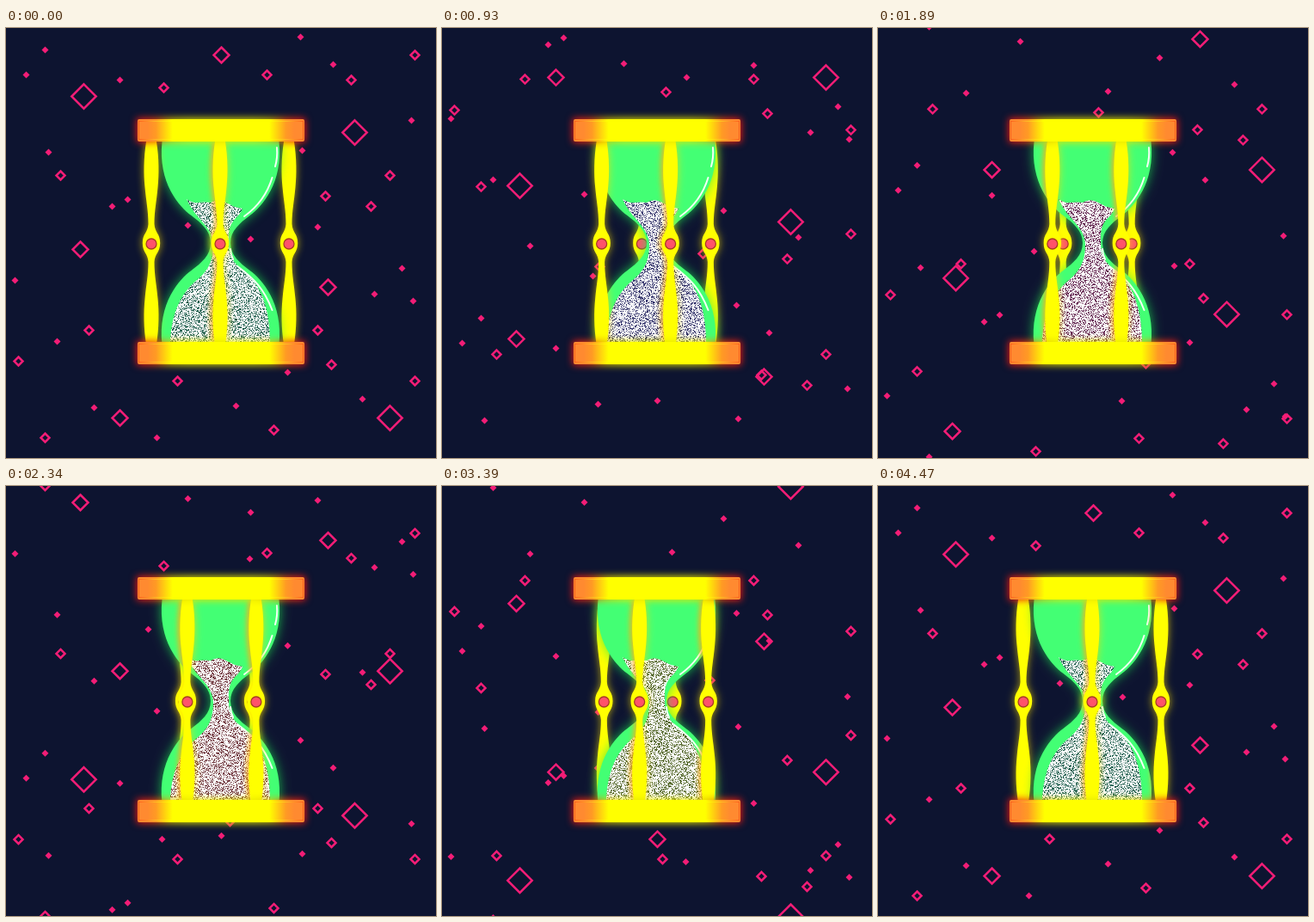
Write an HTML page with a canvas that moves like this. It is 500 px wide and 500 px high and loops after 4500 ms.

```html
<!DOCTYPE html>
<html lang="en">
<head>
<meta charset="utf-8">
<title>Hourglass</title>
<style>
  html, body { margin: 0; width: 100%; height: 100%; overflow: hidden; background: #0d1430; }
  canvas { display: block; width: 500px; height: 500px; }
</style>
</head>
<body>
<canvas id="stage" width="500" height="500"></canvas>
<script>
const ctx = document.getElementById('stage').getContext('2d');
const STEP = 30, STEPS = 150, SIZE = 500;
const YELLOW = '#ffff00', GREEN = '#43ff74', PINK = '#f21d76';

// Each layer falls a whole number of stage heights per loop.
const layers = [
  { speed: 1, half: 14.2, spots: [[90, 79], [405, 121], [446, 453]] },
  { speed: 1, half: 9, spots: [[250, 31], [86, 257], [374, 301], [132, 453]] },
  { speed: 2, half: 5, spots: [
    [183, 69], [303, 54], [401, 60], [475, 31], [63, 171], [446, 171], [371, 195], [424, 207],
    [96, 351], [362, 351], [14, 387], [378, 391], [199, 410], [475, 410], [45, 476], [311, 467],
    [260, 366], [256, 175]] },
  { speed: 3, half: 4, solid: true, spots: [
    [45, 25], [23, 54], [132, 60], [342, 10], [380, 42], [471, 107], [49, 144], [123, 207],
    [141, 199], [344, 142], [211, 229], [284, 245], [362, 231], [10, 293], [460, 279], [428, 309],
    [473, 317], [59, 364], [102, 441], [267, 439], [327, 400], [175, 476], [414, 431],
    [165, 381], [283, 299], [181, 125], [250, 121]] }
];

function diamond(x, y, half, solid) {
  ctx.beginPath();
  ctx.moveTo(x, y - half);
  ctx.lineTo(x + half, y);
  ctx.lineTo(x, y + half);
  ctx.lineTo(x - half, y);
  ctx.closePath();
  if (solid) ctx.fill(); else ctx.stroke();
}

function drawSky(p) {
  ctx.fillStyle = '#0d1430';
  ctx.fillRect(0, 0, SIZE, SIZE);
  ctx.fillStyle = ctx.strokeStyle = PINK;
  ctx.lineWidth = 2.5;
  for (const { speed, half, solid, spots } of layers) {
    for (const [x, y0] of spots) {
      const y = (y0 + p * speed * SIZE) % SIZE;
      for (const wrap of [-SIZE, 0, SIZE]) diamond(x + 0.5, y + wrap + 0.5, half, solid);
    }
  }
}

// Builds a shape from its right side; the left side is the same turned by 180 degrees.
function turned(cx, cy, trace) {
  const path = new Path2D();
  for (const s of [1, -1]) {
    const at = (...v) => v.map((n, i) => (i % 2 ? cy : cx) + s * n);
    trace(
      (...v) => path.lineTo(...at(...v)),
      (...v) => path.bezierCurveTo(...at(...v)));
  }
  path.closePath();
  return path;
}

const glass = turned(249.5, 250, (line, curve) => {
  line(68, -118);
  curve(73, -70, 48, -42, 34, -32);
  curve(22, -23, 11.5, -14, 11.5, 0);
  curve(11.5, 14, 22, 23, 34, 32);
  curve(48, 42, 73, 70, 68, 118);
});

const pillar = turned(0, 250, (line, curve) => {
  line(6, -118);
  curve(9, -98, 9, -80, 7.5, -65);
  curve(6, -48, 3.5, -38, 3.5, -22);
  curve(4, -12, 10.2, -11, 10.2, 0);
  curve(10.2, 11, 4, 12, 3.5, 22);
  curve(3.5, 38, 6, 48, 7.5, 65);
  curve(9, 80, 9, 98, 6, 118);
});

const sand = new Path2D(
  'M210 199 Q217 204 224 203 T238 203 Q246 198 254 202 T266 208 L275 210 ' +
  'Q272 217 266 222 C258 231 259 240 259 250 C259 263 263 273 275 281 ' +
  'C296 297 307 326 307 366 L191 366 C192 333 203 309 221 294 ' +
  'C236 282 241 270 241 252 C241 236 228 226 219 214 Q214 208 210 199Z');

const shine = new Path2D(
  'M315 139 Q316 151 313 161 M309.5 174 Q301 202 277 219 ' +
  'M261 257 Q261 263 264 269 M269 277 C288 291 300 303 309.5 328');

// Sand grains: each one has its own phase in a loop-long shimmer.
const grainBox = { x: 188, y: 196, w: 122, h: 172 };
const grainCanvas = document.createElement('canvas');
grainCanvas.width = grainBox.w;
grainCanvas.height = grainBox.h;
const grainCtx = grainCanvas.getContext('2d');
const grains = grainCtx.createImageData(grainBox.w, grainBox.h);
let seed = 7;
const phases = Array.from({ length: grainBox.w * grainBox.h }, () => {
  seed = (Math.imul(seed, 1664525) + 1013904223) >>> 0;
  return seed / 4294967296;
});

function drawSand(p) {
  const hue = 165 + 360 * p;
  const depth = [0, 120, 240].map(c => 200 * (1 - 0.2 * Math.cos((hue - c) * Math.PI / 180)));
  phases.forEach((phase, i) => {
    const dark = Math.max(0, Math.sin((phase + p) * Math.PI * 2));
    for (let c = 0; c < 3; c++) grains.data[i * 4 + c] = 255 - dark * depth[c];
    grains.data[i * 4 + 3] = 255;
  });
  grainCtx.putImageData(grains, 0, 0);
  ctx.save();
  ctx.clip(sand);
  ctx.drawImage(grainCanvas, grainBox.x, grainBox.y);
  ctx.restore();
}

function drawGlass(p) {
  ctx.save();
  ctx.shadowColor = 'rgba(30,235,80,.75)';
  ctx.shadowBlur = 13;
  ctx.fillStyle = GREEN;
  ctx.fill(glass);
  ctx.restore();
  drawSand(p);
  ctx.strokeStyle = '#f4fff6';
  ctx.lineWidth = 2;
  ctx.lineCap = 'round';
  ctx.stroke(shine);
}

function drawPillar(x, front) {
  if (front) {
    ctx.save();
    ctx.clip(glass);
    ctx.translate(x - 3, 0);
    ctx.filter = 'blur(2.5px)';
    ctx.fillStyle = 'rgba(255,140,40,.6)';
    ctx.fill(pillar);
    ctx.restore();
  }
  ctx.save();
  ctx.translate(x, 0);
  ctx.shadowColor = 'rgba(255,225,0,.7)';
  ctx.shadowBlur = 10;
  ctx.fillStyle = YELLOW;
  ctx.fill(pillar);
  ctx.shadowBlur = 0;
  ctx.beginPath();
  ctx.arc(0, 251, 6, 0, Math.PI * 2);
  ctx.fillStyle = '#ff526a';
  ctx.fill();
  ctx.strokeStyle = '#a83a24';
  ctx.lineWidth = 1.3;
  ctx.stroke();
  ctx.restore();
}

function barPaint(stops) {
  const paint = ctx.createLinearGradient(153, 0, 347, 0);
  for (const [at, color] of stops) {
    paint.addColorStop(at, color);
    paint.addColorStop(1 - at, color);
  }
  return paint;
}
const barFill = barPaint([[0, '#ff8a30'], [0.06, '#ff8a30'], [0.11, '#ff9a24'], [0.15, '#ffc414'], [0.21, YELLOW]]);
const barGlow = barPaint([[0, '#f01414'], [0.1, '#f03c0a'], [0.2, '#e0c800'], [0.3, '#e6e600']]);
const barEdge = barPaint([[0, '#ff5a1e'], [0.1, '#ffb428'], [0.2, YELLOW]]);

function drawBar(y) {
  ctx.save();
  ctx.filter = 'blur(4px)';
  ctx.fillStyle = barGlow;
  ctx.fillRect(152, y - 1, 196, 28);
  ctx.restore();
  ctx.fillStyle = barFill;
  ctx.beginPath();
  ctx.roundRect(153, y, 194, 26, 2);
  ctx.fill();
  ctx.strokeStyle = barEdge;
  ctx.lineWidth = 1;
  ctx.strokeRect(154.5, y + 2.5, 191, 21);
}

function draw(p) {
  const shift = 80 * p;
  drawSky(p);
  for (const x of [249, 329]) drawPillar(x - shift, false);
  drawGlass(p);
  for (const x of [169, 249]) drawPillar(x + shift, true);
  drawBar(106);
  drawBar(365);
}

let shown = -1;
const start = performance.now();
function tick() {
  const step = Math.floor((performance.now() - start) / STEP) % STEPS;
  if (step !== shown) draw(step / (STEPS - 1));
  shown = step;
  requestAnimationFrame(tick);
}
tick();
</script>
</body>
</html>
```
